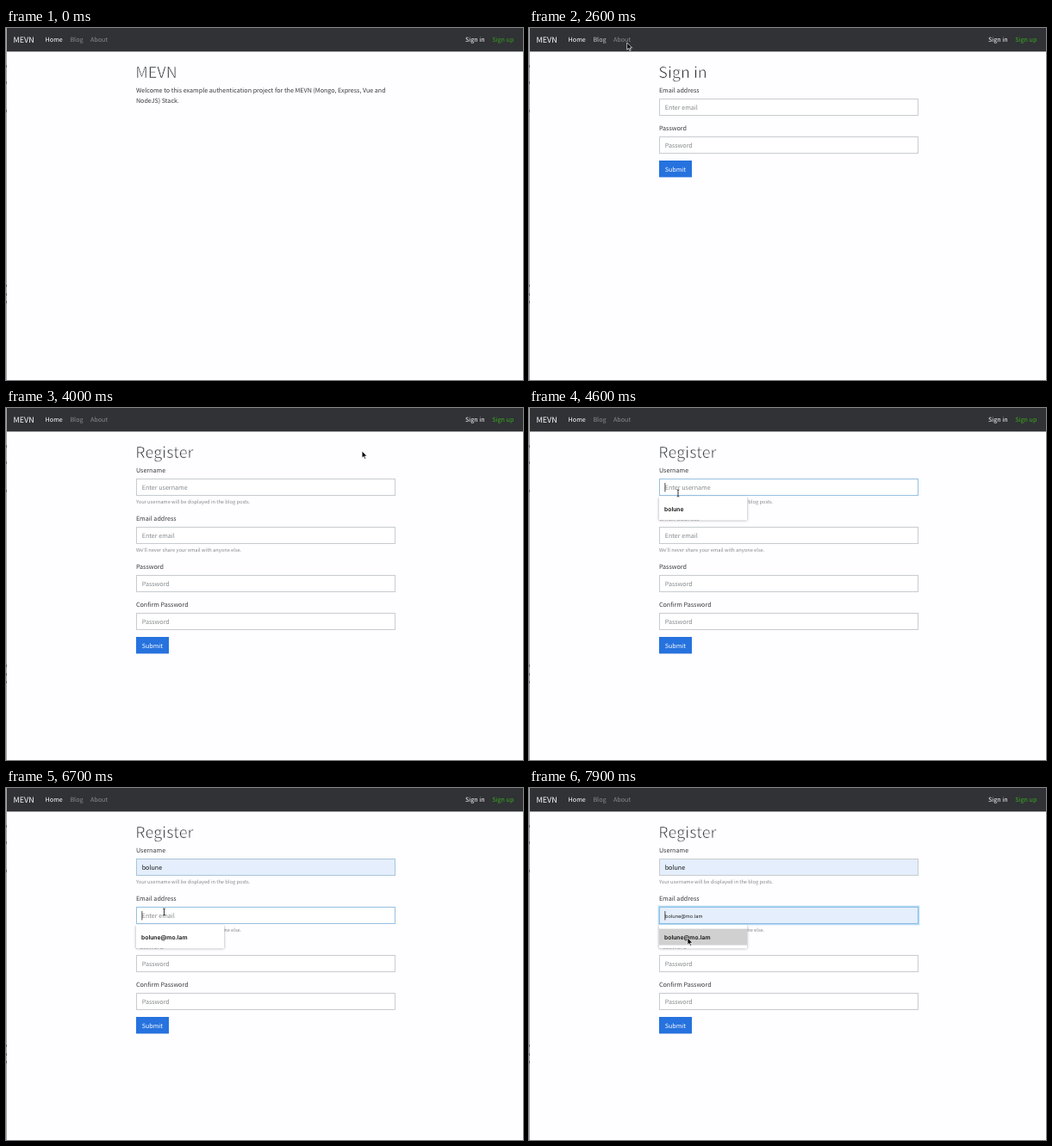
Animation of 600x409 px, one loop 8000 ms. Source, as an HTML page with a canvas:

```html
<!DOCTYPE html>
<html lang="en">
<head>
<meta charset="utf-8">
<title>MEVN</title>
<style>
html, body { margin: 0; width: 600px; height: 409px; overflow: hidden; background: #fefdff; }
canvas { display: block; }
</style>
</head>
<body>
<canvas id="stage" width="600" height="409"></canvas>
<script>
const ctx = document.getElementById('stage').getContext('2d');
const LOOP = 8000, STEP = 100;
const PAGE = '#fefdff', INK = '#373a3c', MUTED = '#85888b', BLUE = '#2672de', FILLED = '#e4eefc';
const SANS = '"Noto Sans CJK JP", "Noto Sans CJK SC", "Noto Sans CJK", sans-serif';
const UI = 'Inter, sans-serif';
const USER = 'bolune', MAIL = 'bolune@mo.lam';

// Times of the events
const OPEN_LOGIN = 1900, OPEN_REGISTER = 3700;
const FOCUS_NAME = 4570, PICK_NAME = 6200, FOCUS_MAIL = 6670;

const pointerPath = [
  [500, 290, 384], [1300, 87, 17], [2500, 87, 17], [3200, 569, 18], [3700, 569, 18],
  [4400, 173, 99], [4600, 173, 99], [5000, 174, 107], [5900, 174, 107], [6000, 176, 116],
  [6200, 176, 116], [6500, 183.5, 144], [7400, 183.5, 144], [7700, 184, 174]
];
const blogGlow = [[1300, 0], [1500, 1], [2500, 1], [2700, 0]];
const signUpDim = [[0, .12], [100, .12], [200, 0], [3100, 0], [3200, 1], [3700, 1], [3900, 0]];

const arrow = new Path2D('M0 0V8.2L1.9 6.5L3.2 9.4L4.5 8.8L3.2 6H5.9Z');
const hand = new Path2D('M-.8 .6Q0 -.6 .8 .6V3Q2 2.4 2.4 3.3Q3.4 2.9 3.6 3.8Q4.6 3.6 4.6 4.6V6L3.8 8.3H-.6L-2.8 5.2Q-2.6 4.2 -1.7 4.8L-.8 5.6Z');
const beam = new Path2D('M-1.3 -4Q0 -4 0 -3V3Q0 4 -1.3 4M1.3 -4Q0 -4 0 -3M0 3Q0 4 1.3 4');

const clamp = v => Math.min(1, Math.max(0, v));
const ease = v => v * v * (3 - 2 * v);

// Eased values at time t from rows of [time, ...values]
function at(keys, t) {
  const i = keys.findIndex(k => k[0] > t);
  if (i < 0) return keys[keys.length - 1].slice(1);
  if (i === 0) return keys[0].slice(1);
  const a = keys[i - 1], b = keys[i], p = ease((t - a[0]) / (b[0] - a[0]));
  return a.slice(1).map((v, j) => v + (b[j + 1] - v) * p);
}

function mix(a, b, p) {
  return `rgb(${a.map((v, i) => Math.round(v + (b[i] - v) * p))})`;
}

function rect(x, y, w, h, color) {
  ctx.fillStyle = color;
  ctx.fillRect(x, y, w, h);
}

function write(str, x, y, color, font) {
  ctx.font = font;
  ctx.fillStyle = color;
  ctx.fillText(str, x, y);
}

const sans = (size, weight = 400) => `${weight} ${size}px ${SANS}`;
const text = (str, x, y, color = INK, size = 7.16) => write(str, x, y, color, sans(size));

function widthOf(str, font) {
  ctx.font = font;
  return ctx.measureText(str).width;
}

function heading(str) {
  write(str, 150.3, 57.6, INK, sans(17.9, 300));
  // Thin the letters where the font has no light cut
  if (widthOf(str, sans(17.9, 300)) === widthOf(str, sans(17.9))) {
    ctx.strokeStyle = PAGE;
    ctx.lineWidth = .55;
    ctx.strokeText(str, 150.3, 57.6);
  }
}

function navbar(t) {
  rect(0, 0, 600, 27.4, '#303236');
  text('MEVN', 8.5, 17, '#fff', 8.95);
  text('Home', 45.6, 16.3, '#fff');
  text('Blog', 74.4, 16.3, mix([137, 139, 142], [255, 255, 255], at(blogGlow, t)[0]));
  text('About', 98, 16.3, '#898b8e');
  text('Sign in', 533, 16.3, '#fff');
  text('Sign up', 564.3, 16.3, mix([58, 172, 28], [32, 84, 28], at(signUpDim, t)[0]));
}

function field(y, hint, { ring = 0, value, preview, caret } = {}) {
  const tint = value || preview;
  if (ring) {
    ctx.strokeStyle = `rgba(110, 184, 232, ${.5 * ring})`;
    ctx.lineWidth = 1 + 2.6 * ring;
    ctx.strokeRect(151.5, y + .5, 300, 19);
  }
  rect(151.5, y + .5, 300, 19, tint ? FILLED : '#fff');
  ctx.strokeStyle = mix([200, 204, 207], [140, 190, 230], Math.min(1, ring * 4));
  ctx.lineWidth = 1;
  ctx.strokeRect(151.5, y + .5, 300, 19);
  if (preview) write(preview, 158, y + 13.1, '#222', `5.7px ${UI}`);
  else text(value || hint, 157.7, y + 13.1, value ? '#16181a' : MUTED);
  if (caret) rect(157.5, y + 5, .8, 10.5, '#222');
}

function button(y) {
  rect(151, y, 38, 19.4, BLUE);
  text('Submit', 157.7, y + 12.6, '#fff');
}

function suggestion(y, label, active) {
  ctx.save();
  ctx.shadowColor = 'rgba(0, 0, 0, .4)';
  ctx.shadowBlur = 3;
  ctx.shadowOffsetY = .8;
  rect(151, y, 102, 27.5, '#fff');
  ctx.restore();
  if (active) rect(151, y + 4.6, 102, 19, '#d0d0d1');
  write(label, 157, y + 16.7, '#111', `600 6.8px ${UI}`);
}

function home() {
  heading('MEVN');
  text('Welcome to this example authentication project for the MEVN (Mongo, Express, Vue and', 150.9, 75);
  text('NodeJS) Stack.', 150.9, 87);
}

function login() {
  heading('Sign in');
  text('Email address', 150.9, 75);
  field(82, 'Enter email');
  text('Password', 150.9, 119.2);
  field(126, 'Password');
  button(154);
}

function register(t, y) {
  const grow = from => clamp((t - from) / 150);
  const blink = from => t >= from && (t - from) % 1000 < 500;
  const picking = t >= FOCUS_NAME && t < PICK_NAME;
  const overName = picking && y > 109;
  const overMail = t >= FOCUS_MAIL && y > 163;

  heading('Register');
  text('Username', 150.9, 75);
  field(82, 'Enter username', {
    ring: t < FOCUS_MAIL ? grow(FOCUS_NAME) : 1 - grow(FOCUS_MAIL - 100),
    value: t >= PICK_NAME && USER,
    preview: overName && USER,
    caret: picking && blink(FOCUS_NAME)
  });
  text('Your username will be displayed in the blog posts.', 150.9, 111.2, MUTED, 5.73);
  text('Email address', 150.9, 131);
  field(138, 'Enter email', {
    ring: grow(FOCUS_MAIL),
    preview: overMail && MAIL,
    caret: blink(FOCUS_MAIL)
  });
  text('We’ll never share your email with anyone else.', 150.9, 166.8, MUTED, 5.73);
  text('Password', 150.9, 186.6);
  field(194, 'Password');
  text('Confirm Password', 150.9, 230.7);
  field(238, 'Password');
  button(266);
  if (picking) suggestion(103, USER, overName);
  if (t >= FOCUS_MAIL) suggestion(159, MAIL, overMail);
}

function statusBar(url) {
  const w = widthOf(url, `6.4px ${UI}`) + 7;
  ctx.beginPath();
  ctx.roundRect(-2, 399.5, w + 2, 14, 2);
  ctx.fillStyle = '#e9e8ea';
  ctx.fill();
  ctx.strokeStyle = '#b4b4b6';
  ctx.lineWidth = 1;
  ctx.stroke();
  write(url, 3, 407, '#4a4a4c', `6.4px ${UI}`);
}

function pointer(t, x, y) {
  const inField = t >= OPEN_REGISTER && x > 151 && x < 452 &&
    [82, 138, 194, 238].some(top => y > top && y < top + 20);
  const onLink = y > 9 && y < 22 && (x > 74 && x < 91 || x > 564 && x < 590);
  ctx.save();
  ctx.translate(x, y);
  ctx.lineJoin = 'round';
  const [shape, fill, line, width] = inField ? [beam, null, '#222', .9]
    : onLink ? [hand, '#fff', '#111', .7] : [arrow, '#000', '#fff', .7];
  ctx.strokeStyle = line;
  ctx.lineWidth = width;
  if (fill) {
    ctx.fillStyle = fill;
    ctx.fill(shape);
  }
  ctx.stroke(shape);
  ctx.restore();
}

function draw(t) {
  const [x, y] = at(pointerPath, t);
  rect(0, 0, 600, 409, PAGE);
  if (t < OPEN_LOGIN) home();
  else if (t < OPEN_REGISTER) login();
  else register(t, y);
  navbar(t);
  rect(0, 0, 1, 409, '#a8a8ab');
  for (const mark of [43, 62, 95, 298, 308, 317]) rect(0, mark, 1, 3, '#68686c');
  if (t >= 1400 && t < 2600) statusBar('localhost:8080/#/blog');
  if (t >= 3200 && t < 3800) statusBar('localhost:8080/#/register');
  if (t >= 500) pointer(t, x, y);
}

ctx.textRendering = 'geometricPrecision';
const start = performance.now();
function tick() {
  const t = (performance.now() - start) % LOOP;
  draw(Math.floor(t / STEP) * STEP);
  requestAnimationFrame(tick);
}
tick();
</script>
</body>
</html>
```
